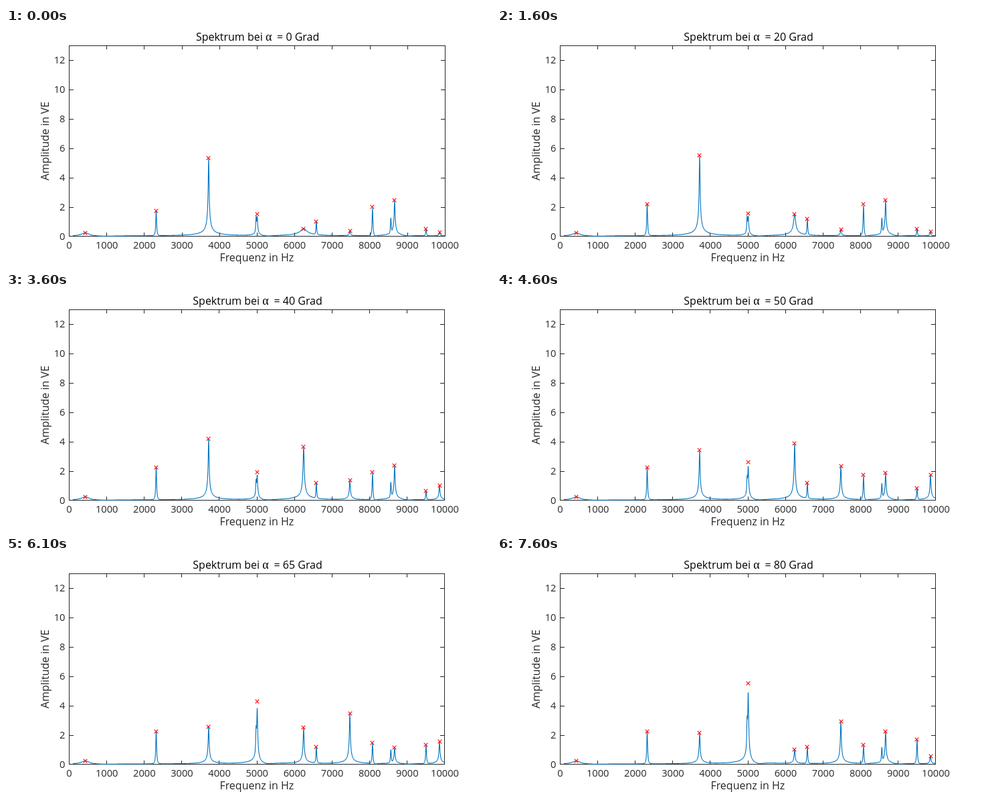
An HTML page that plays this animation: 725x353 px, repeating every 8000 ms.

```html
<!DOCTYPE html>
<html lang="de">
<head>
<meta charset="utf-8">
<title>Spektrum</title>
<style>
  html, body { margin: 0; width: 100%; height: 100%; overflow: hidden; background: #fff; }
  svg { display: block; width: 725px; height: 353px; }
  text { font-family: "Open Sans", "Noto Sans", sans-serif; font-size: 14.67px; fill: #262626; }
  .label { font-size: 16px; }
  .title text { font-size: 16px; fill: #000; }
  .title .greek { font-family: "Liberation Serif", serif; font-size: 18px; }
  path { fill: none; }
</style>
</head>
<body>
<svg viewBox="0 0 725 353">
  <rect width="725" height="353" fill="#fff"/>
  <path id="axes" stroke="#262626" shape-rendering="crispEdges"/>
  <g id="ticks"></g>
  <text class="label" x="374.8" y="349" text-anchor="middle">Frequenz in Hz</text>
  <text class="label" transform="translate(64 169) rotate(-90)" text-anchor="middle">Amplitude in VE</text>
  <g class="title" id="title">
    <text x="279.3" y="19">Spektrum bei</text>
    <text class="greek" x="388" y="19" text-anchor="middle">α</text>
  </g>
  <g class="title"><text id="angle" y="19"></text></g>
  <path id="curve" stroke="#0072bd" stroke-width="1.1" stroke-linejoin="round"/>
  <path id="marks" stroke="#f00" stroke-width="1.1"/>
</svg>
<script>
const LOOP = 8000, HOLD = 500, FIRST = 100;
const LEFT = 94.5, TOP = 26.5, BASE = 311.5, UNIT = (BASE - TOP) / 13;
const $ = id => document.getElementById(id);
const bell = u => Math.exp(-u * u);

// Each resonance rises or falls by `swing` around one angle.
const mode = (x, base, swing, at, spread, opts) => ({
  x, marked: true, width: () => 0.6, fall: 0.5,
  height: a => base + swing * bell((a - at) / spread), ...opts
});
const sharp = { width: () => 0.75, fall: 1 };
const side = { ...sharp, marked: false };

const MODES = [
  mode(118.9, 5, 0, 0, 1, { width: () => 7, fall: 0.8 }),
  mode(224.5, 49, -11, 0, 12, sharp),
  mode(302.9, 42, 82, 12, 40),
  mode(373.9, 30, 36, 78, 20, side),
  mode(375.5, 33, 88, 82, 28),
  mode(444.9, 9, 77, 47, 25, { width: a => 0.6 + 4 * Math.exp(-a / 12) }),
  mode(463.9, 26, -4, 0, 12, sharp),
  mode(514, 8, 69, 68, 26),
  mode(547.9, 28, 20, 18, 38, sharp),
  mode(575.3, 27, -5, 65, 15, side),
  mode(580.9, 54, -31, 62, 13),
  mode(627.9, 11, 26, 82, 28, sharp),
  mode(648, 6, 36, 56, 18)
];

// Antiresonances: x and width
const DIPS = [[150, 18], [392, 12], [553, 3], [602, 9]];

function curvePath(a, right) {
  const peaks = MODES.map(m => ({ x: m.x, h: m.height(a), w: m.width(a), q: m.fall }));
  let d = "";
  for (let x = 100; x <= right; x += 0.2) {
    let sum = 0;
    for (const p of peaks) {
      const u = (x - p.x) / p.w;
      sum += (p.h / (1 + u * u) ** p.q) ** 2;
    }
    let v = Math.sqrt(sum);
    for (const [c, w] of DIPS) v *= 1 - 0.7 * bell((x - c) / w);
    d += (d ? "L" : "M") + x.toFixed(2) + " " + (BASE - v).toFixed(2);
  }
  return d;
}

function marksPath(a) {
  return MODES.filter(m => m.marked).map(m => {
    const x = Math.floor(m.x) + 0.5, y = Math.floor(BASE - m.height(a)) + 0.5;
    return `M${x - 2.8} ${y - 2.8}l5.6 5.6m0 -5.6l-5.6 5.6`;
  }).join("");
}

function axesPath(right) {
  let d = `M${LEFT} ${TOP}H${right}V${BASE}H${LEFT}Z`;
  for (let i = 1; i < 10; i++) {
    const x = LEFT + (right - LEFT) * i / 10;
    d += `M${x} ${BASE}v-5.5M${x} ${TOP}v5.5`;
  }
  for (let v = 2; v <= 12; v += 2) {
    const y = Math.round(BASE - v * UNIT) + 0.5;
    d += `M${LEFT} ${y}h6.5M${right} ${y}h-6.5`;
  }
  return d;
}

function addTicks() {
  let s = "";
  for (let i = 0; i <= 10; i++)
    s += `<text x="${LEFT + i * 56.15}" y="330" text-anchor="middle">${i * 1000}</text>`;
  for (let v = 0; v <= 12; v += 2)
    s += `<text x="88.5" y="${BASE - v * UNIT + 5}" text-anchor="end">${v}</text>`;
  $("ticks").innerHTML = s;
}

let shown = -1;
function draw(t) {
  const a = 5 * Math.floor((t % LOOP + HOLD - FIRST) / HOLD);
  if (a === shown) return;
  shown = a;
  const right = a ? 655.5 : 656.5, shift = a < 10 ? 4.6 : 0;
  $("axes").setAttribute("d", axesPath(right));
  $("curve").setAttribute("d", curvePath(a, right));
  $("marks").setAttribute("d", marksPath(a));
  $("title").setAttribute("transform", `translate(${shift} 0)`);
  $("angle").setAttribute("x", 400.5 + shift);
  $("angle").textContent = `= ${a} Grad`;
}

addTicks();
const start = performance.now();
function tick() {
  draw(performance.now() - start);
  requestAnimationFrame(tick);
}
draw(0);
requestAnimationFrame(tick);
</script>
</body>
</html>
```
